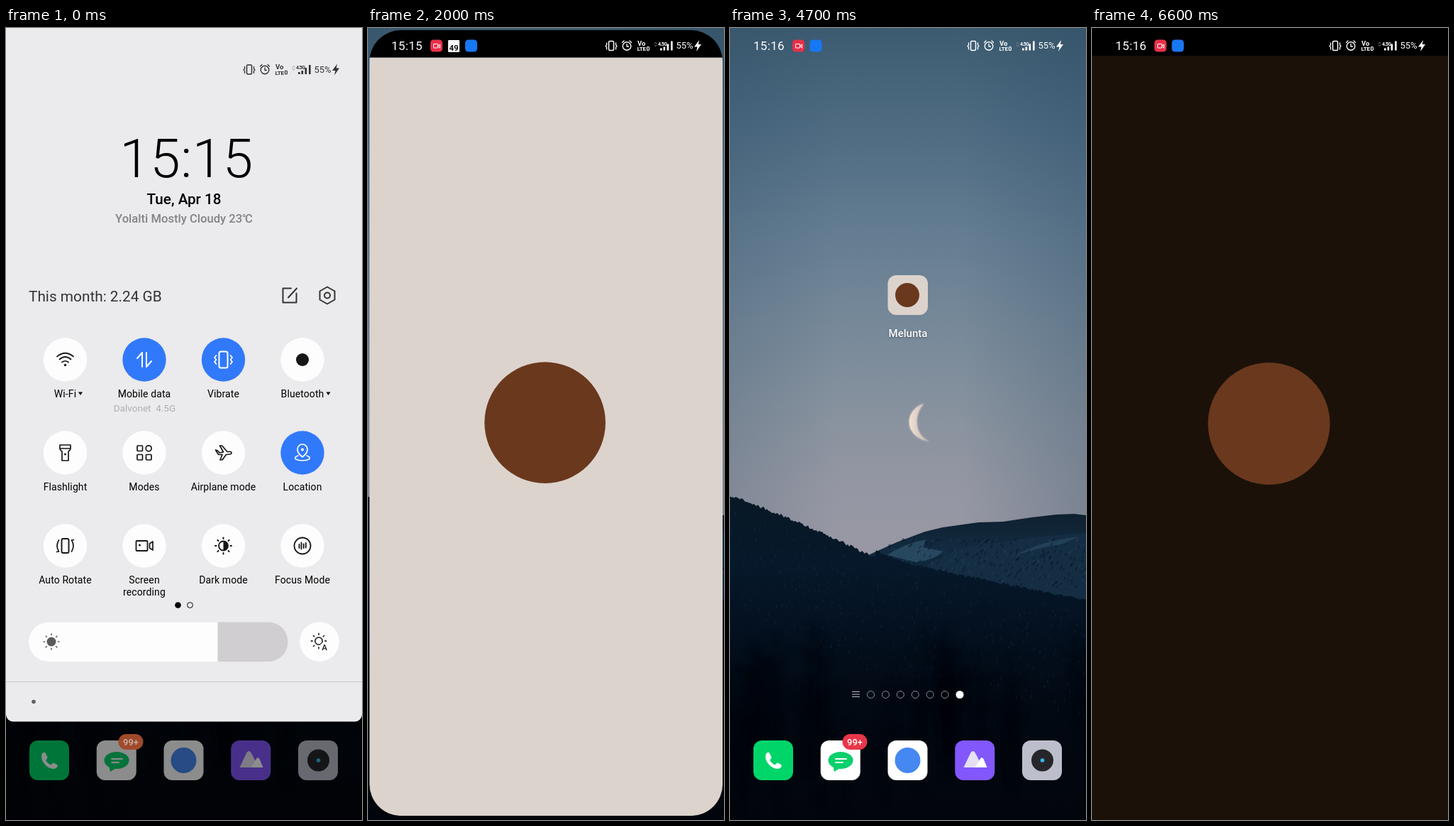
These frames come from a looping animation (502 px wide and 1115 px high, 7.3 s). An HTML page with a canvas:

```html
<!DOCTYPE html>
<html lang="en">
<head>
<meta charset="utf-8">
<title>Phone theme demo</title>
<style>
html, body { margin: 0; width: 100%; height: 100%; overflow: hidden; background: #000; }
canvas { display: block; width: 502px; height: 1115px; }
</style>
</head>
<body>
<canvas id="stage" width="502" height="1115"></canvas>
<script>
const W = 502, H = 1115, LOOP = 7300, TAU = Math.PI * 2;
const BLUE = '#3179fb', BROWN = '#6a381d', FONT = 'Roboto, "Open Sans", sans-serif';
const screen = document.getElementById('stage').getContext('2d');
let c = screen;

function rng(seed) {
  return () => (seed = (seed * 16807) % 2147483647) / 2147483647;
}
function disc(x, y, r, color) {
  c.fillStyle = color;
  c.beginPath(); c.arc(x, y, r, 0, TAU); c.fill();
}
function ring(x, y, r, color, w = 1.6) {
  c.strokeStyle = color; c.lineWidth = w;
  c.beginPath(); c.arc(x, y, r, 0, TAU); c.stroke();
}
function boxPath(x, y, w, h, r) {
  c.beginPath(); c.roundRect(x, y, w, h, r);
}
function box(x, y, w, h, r, color) {
  c.fillStyle = color; boxPath(x, y, w, h, r); c.fill();
}
function frame(x, y, w, h, r, color, lw = 1.7) {
  c.strokeStyle = color; c.lineWidth = lw; boxPath(x, y, w, h, r); c.stroke();
}
// Stroke or fill an SVG path placed at x, y
function draw(d, x, y, color, lw = 1.7, fill = false) {
  c.save();
  c.translate(x, y);
  c.lineCap = c.lineJoin = 'round';
  c.strokeStyle = c.fillStyle = color;
  c.lineWidth = lw;
  fill ? c.fill(new Path2D(d)) : c.stroke(new Path2D(d));
  c.restore();
}
function text(s, x, y, size, color, align = 'center', weight = 400, space = 0) {
  c.font = `${weight} ${size}px ${FONT}`;
  c.letterSpacing = space + 'px';
  c.textAlign = align;
  c.fillStyle = color;
  c.fillText(s, x, y);
}
function rays(x, y, r1, r2, color, w = 1.8) {
  let d = '';
  for (let i = 0; i < 8; i++) {
    const a = i * TAU / 8, p = Math.cos(a), q = Math.sin(a);
    d += `M${p * r1} ${q * r1}L${p * r2} ${q * r2}`;
  }
  draw(d, x, y, color, w);
}

// ---- wallpaper ----
function makeWallpaper() {
  const cv = document.createElement('canvas');
  cv.width = W; cv.height = H;
  c = cv.getContext('2d');
  const rand = rng(77);
  const fade = (y0, y1, stops) => {
    const g = c.createLinearGradient(0, y0, 0, y1);
    stops.forEach(([y, col]) => g.addColorStop((y - y0) / (y1 - y0), col));
    return g;
  };
  c.fillStyle = fade(0, 740, [[0, '#3d5b70'], [150, '#4f6c83'], [300, '#667e92'],
    [430, '#788a9a'], [560, '#8a939f'], [650, '#9497a3'], [740, '#9898a4']]);
  c.fillRect(0, 0, W, H);
  // darker, bluer edges
  const edge = c.createLinearGradient(0, 0, W, 0);
  edge.addColorStop(0, 'rgba(30,62,90,.16)');
  edge.addColorStop(.3, 'rgba(30,62,90,0)');
  edge.addColorStop(.65, 'rgba(30,62,90,0)');
  edge.addColorStop(1, 'rgba(30,62,90,.22)');
  c.fillStyle = edge;
  c.fillRect(0, 0, W, H);

  c.shadowColor = '#e8d5c8'; c.shadowBlur = 3;
  const moon = c.createLinearGradient(252, 0, 276, 0);
  moon.addColorStop(0, '#f3e2d4'); moon.addColorStop(1, '#c9bcb8');
  draw('M273 529C246 538 244 575 281 582C260 574 258 545 273 529Z', 0, 0, moon, 1, true);
  c.shadowBlur = 0;

  // far range
  draw('M195 742L235 724L275 709L300 703L350 696L385 695L425 689L460 685L485 684L502 686V830H195Z',
    0, 0, fade(684, 810, [[684, '#0f2030'], [735, '#122b40'], [810, '#081a2b']]), 1, true);
  draw('M222 742Q245 726 277 720L272 731L301 737Q285 750 262 752Z', 0, 0, '#27475f', 1, true);
  draw('M276 758Q318 728 380 724Q440 714 502 711V812L400 792Z', 0, 0, '#142d42', 1, true);
  draw('M402 742Q440 722 492 716L470 726L440 732Z', 0, 0, '#213f57', 1, true);
  for (let i = 0; i < 320; i++) {
    const x = 225 + rand() * 277, y = 718 + rand() * 70;
    draw('M0 0l-2 3', x, y, rand() < .55 ? 'rgba(6,18,30,.5)' : 'rgba(56,92,120,.22)', 1.5);
  }

  // wooded slope
  const ridge = x => x < 205 ? 660 + x * .43 - 3.5 * Math.sin(x / 205 * Math.PI)
    : 748 - 11 * Math.exp(-(x - 205) / 30) + (x - 205) * .2;
  c.fillStyle = fade(660, H, [[660, '#081826'], [760, '#06182a'], [850, '#04101f'], [950, '#020912'], [H, '#02050c']]);
  c.beginPath(); c.moveTo(0, H);
  for (let x = 0; x <= W; x += 2) c.lineTo(x, ridge(x) - rand() * 4);
  c.lineTo(W, H); c.fill();
  for (let i = 0; i < 650; i++) {
    const x = rand() * W, y = ridge(x) + 12 + rand() * 150;
    draw('M0 0v3', x, y, `rgba(58,88,114,${rand() * .24})`, 1.2);
  }
  c.filter = 'blur(5px)';
  for (let i = 0; i < 40; i++) {
    const x = rand() * W, y = 840 + rand() * 150;
    draw('M0 130Q-4 60 0 0M-16 32L0 46L15 28', x, y, 'rgba(0,3,9,.32)', 7);
  }
  c = screen;
  return cv;
}
const wallpaper = makeWallpaper();

// ---- status bar ----
function statusIcons(y, col) {
  frame(339.5, y - 6.5, 7, 13, 1.5, col, 1.5);
  draw('M-6 -4v3l-1.5 1.5l1.5 1.5v3M7 -4v3l1.5 1.5l-1.5 1.5v3', 342.5, y, col, 1.3);
  ring(365, y + .5, 5.8, col, 1.4);
  draw('M0 -2.5V1H2.5M-6.5 -4.5L-4 -7M6.5 -4.5L4 -7', 365, y, col, 1.3);
  text('Vo', 380, y - .5, 9.5, col, 'left', 700);
  text('LTE', 379.5, y + 7, 8, col, 'left', 700, -.2);
  frame(393.5, y + 1.5, 2.8, 5, 1, col, 1.2);
  text('4.5G', 409, y - .5, 7, col, 'left', 700, -.6);
  draw('M-1.5 -3L0 -5L1.5 -3M-1.5 -1L0 1L1.5 -1', 405.5, y, '#8a929a', .8);
  [[412, 3], [416.5, 5], [421.5, 9], [427, 13]].forEach(([x, h]) => {
    c.fillStyle = col; c.fillRect(x, y + 6.5 - h, 2.6, h);
  });
  text('55%', 434.5, y + 4, 13, col, 'left');
  draw('M2 -8L-5 1.5H-.5L-2 8L5 -2H.8Z', 465, y, col, 1, true);
}
function count(x, y, bg, fg) {
  box(x, y, 16, 17, 1, bg);
  text('49', x + 8, y + 15, 11.5, fg, 'center', 700);
}
function statusBar(time, badge) {
  text(time, 33, 31, 17, '#fff', 'left', 400, .3);
  box(88, 16.5, 17, 17, 4.5, '#e8304a');
  frame(92.5, 22.5, 6, 5.5, .5, '#fff', 1);
  draw('M99 25L101.5 23V28Z', 0, 0, '#fff', 1);
  if (badge) count(113, 17, '#fff', '#111');
  box(badge ? 137 : 112.5, 16.5, 17, 17, 4.5, '#1877f2');
  statusIcons(25, '#fff');
}

// ---- home screen ----
function dock() {
  ['#00d56a', '#fff', '#fff', '#8257fb', '#bcbfcb'].forEach((col, i) =>
    box(33 + i * 94.75, 1003, 56, 56, 12, col));
  draw('M-10 -9Q-8 -13 -5 -11L-2 -5Q-2 -3 -4.5 -1Q-2 4 3 6Q5 3 7 3L12 6Q13 9 9 11Q2 13 -5 6Q-12 -1 -10 -9Z',
    60.5, 1031.5, '#fff', 1, true);
  c.fillStyle = '#0bd06b';
  c.beginPath(); c.ellipse(156, 1031, 17.5, 12, 0, 0, TAU); c.fill();
  draw('M-11 7L-9 16L1 10Z', 156, 1031, '#0bd06b', 1, true);
  draw('M-7 -2H8M-7 3H3', 156, 1031, '#fff', 1.8);
  disc(250.5, 1031, 18, '#4688f1');
  draw('M-16 10L-6 -11Q-3 -15 0 -11L11 10Z', 345.5, 1031, '#e5e0f2', 1, true);
  draw('M0 10L8 -3Q10 -5 12 -2L17 10Z', 345.5, 1031, '#fff', 1, true);
  disc(440.5, 1031, 15.5, '#26262a');
  disc(440.5, 1031, 2.8, '#36b9e6');
}
function dockBadge(bg, fg) {
  box(158.5, 994, 35, 22, 11, bg);
  text('99+', 176, 1009.5, 13, fg, 'center', 500);
}
function home(label) {
  c.drawImage(wallpaper, 0, 0);
  box(222.5, 348, 56.5, 56, 12, '#dcd3cc');
  disc(250, 376, 17, BROWN);
  if (label) {
    c.shadowColor = 'rgba(0,0,0,.45)'; c.shadowBlur = 3; c.shadowOffsetY = 1;
    text('Melunta', 251, 435, 15, '#fff', 'center', 500);
    c.shadowColor = 'transparent'; c.shadowBlur = c.shadowOffsetY = 0;
  }
  draw('M-5 -3.5H5M-5 0H5M-5 3.5H5', 177.5, 938, '#b9bec6', 1.1);
  for (let i = 0; i < 6; i++) ring(198.5 + i * 20.9, 938.5, 5, '#8b929c', 1);
  disc(324, 938.5, 5.5, '#fff');
  dock();
  dockBadge('#e8364a', '#fff');
}

// ---- quick settings ----
const icons = {
  wifi(x, y, k) {
    draw('M-11.5 -4.5Q0 -14 11.5 -4.5M-8 -.5Q0 -7.5 8 -.5M-4.5 3.5Q0 0 4.5 3.5', x, y, k);
    disc(x, y + 7.5, 1.7, k);
  },
  data(x, y, k) { draw('M-10 -2L-3 -10V10M3 -10V10L10 2', x, y, k, 2); },
  vibrate(x, y, k) {
    frame(x - 6, y - 11.5, 12, 23, 2.5, k, 2);
    draw('M-10 -6L-12.5 -3L-10 0L-12.5 3L-10 6M10 -6L12.5 -3L10 0L12.5 3L10 6', x, y, k, 1.8);
  },
  bluetooth(x, y, k) { disc(x, y, 9, k); },
  torch(x, y, k) {
    draw('M-7.5 -11H7.5V-6Q7 -3 4.5 -2V11H-4.5V-2Q-7 -3 -7.5 -6ZM-7 -6H7', x, y, k);
    disc(x, y + 2, 1.5, k);
  },
  modes(x, y, k) {
    frame(x - 10, y - 10, 7.5, 7.5, 1, k);
    frame(x - 10, y + 2.5, 7.5, 7.5, 1, k);
    frame(x + 2.5, y + 2.5, 7.5, 7.5, 1, k);
    ring(x + 6.2, y - 6.2, 4, k, 1.7);
  },
  plane(x, y, k) {
    draw('M-11 -4L-8 -3L-5.5 0L0 -1L-5 -10H-2L5.5 -1.5L10 -1.5Q13 0 10 2L4 2.5L-1.5 10H-4.5L-1.5 2.5L-7 2.5L-11 -4Z', x, y, k);
  },
  place(x, y, k) {
    draw('M0 6Q-7.5 0 -7 -5A7 7 0 0 1 7 -5Q7.5 0 0 6ZM-6 4Q-12 6 -9.5 9Q-6 11 0 11Q6 11 9.5 9Q12 6 6 4', x, y, k);
    disc(x, y - 4.5, 2, k);
  },
  rotate(x, y, k) {
    frame(x - 5, y - 10, 10, 20, 2, k, 1.9);
    draw('M-9 -8Q-14 0 -9 8L-12 8.5M9 8Q14 0 9 -8L12 -8.5', x, y, k);
  },
  record(x, y, k) {
    frame(x - 11.5, y - 7, 16, 14, 1, k, 1.8);
    draw('M7.5 -3L12 -6V6L7.5 3Z', x, y, k);
    disc(x - 6.5, y - 1, 1.5, k);
  },
  dark(x, y, k) {
    ring(x, y, 6.5, k, 1.8);
    draw('M0 -6.5A6.5 6.5 0 0 1 0 6.5Z', x, y, k, 1, true);
    rays(x, y, 10, 11.5, k, 2);
  },
  focus(x, y, k) {
    ring(x, y, 11.5, k, 1.8);
    draw('M-4.5 -2V3M-1.5 -4.5V4.5M1.7 -2.5V3M4.8 -4V2.5', x, y, k, 1.8);
  }
};
const tiles = [
  ['wifi', 'Wi-Fi'], ['data', 'Mobile data', 1], ['vibrate', 'Vibrate', 1], ['bluetooth', 'Bluetooth'],
  ['torch', 'Flashlight'], ['modes', 'Modes'], ['plane', 'Airplane mode'], ['place', 'Location', 1],
  ['rotate', 'Auto Rotate'], ['record', 'Screen'], ['dark', 'Dark mode'], ['focus', 'Focus Mode']
];
const light = { bg: '#ebeaec', ink: '#000', soft: '#333', dim: '#858386', sub: '#b0aeb1', tile: '#fdfdfe',
  icon: '#161616', rest: '#d0ced0', fill: '#fdfdfe', sun: '#5c5b5d', rule: '#c8c7c9' };
const night = { bg: '#111012', ink: '#fff', soft: '#f2f2f2', dim: '#807e81', sub: '#59585a', tile: '#4c4a4d',
  icon: '#a3a2a4', rest: '#2f2d30', fill: '#4c4a4d', sun: '#d2d1d3', rule: '#1b1a1c' };

function shade(p) {
  const isNight = p === night;
  c.drawImage(wallpaper, 0, 0);
  dock();
  c.fillStyle = 'rgba(0,0,0,.45)'; c.fillRect(0, 0, W, H);
  dockBadge('#a04a2b', '#c9b3aa');
  box(0, 0, W, 976.5, [0, 0, 10, 10], p.bg);

  statusIcons(58.5, p.soft);
  text('15:15', 254.5, 209.5, 76.5, p.ink, 'center', 300, .5);
  text('Tue, Apr 18', 251, 248, 20.7, p.ink, 'center', 500);
  text('Yolalti Mostly Cloudy 23℃', 251, 274, 16.6, p.dim, 'center', 500);
  text('This month: 2.24 GB', 32, 384.5, 20.8, p.soft, 'left');
  draw('M2 -10H-9.5V10H9.5V-3M-2 3L10 -10', 400, 376.5, p.soft, 2);
  draw('M0 -12L10.5 -6V6L0 12L-10.5 6V-6Z', 453, 376.5, p.soft, 2);
  ring(453, 376.5, 4, p.soft, 2);

  tiles.forEach(([icon, label, on], i) => {
    const x = 83.5 + (i % 4) * 111.5, y = 467 + Math.floor(i / 4) * 131;
    const lit = on || (icon === 'dark' && isNight);
    const arrow = icon === 'wifi' || icon === 'bluetooth';
    disc(x, y, 30.7, lit ? BLUE : p.tile);
    icons[icon](x, y, lit ? '#fff' : p.icon);
    text(label, x, y + 53, 14, p.ink, 'center', 400, .1);
    if (arrow) draw('M-3 -2H3L0 2.5Z', icon === 'wifi' ? 105 : 454.5, y + 47.5, p.ink, 1, true);
  });
  text('Dalvonet  4.5G', 195.5, 539.5, 13.5, p.sub);
  text('recording', 195, 799, 14, p.ink, 'center', 400, .1);

  disc(242.5, 812.5, 4.3, p.ink);
  ring(259.5, 812.5, 3.9, p.ink, 1);

  c.save();
  boxPath(32, 836.5, 365.5, 55.5, 27.7); c.clip();
  c.fillStyle = p.rest; c.fillRect(32, 836, 366, 57);
  c.fillStyle = p.fill; c.fillRect(32, 836, 266.5, 57);
  c.restore();
  disc(64, 864, 6.5, p.sun);
  rays(64, 864, 9.5, 11, p.sun, 1.6);
  disc(442, 864, 27.8, p.tile);
  if (isNight) text('A', 442, 871, 19, '#d0cfd1', 'center', 500);
  else {
    ring(441, 863, 5.2, '#333', 1.8);
    rays(441, 863, 9, 10.5, '#333', 1.8);
    disc(449, 871, 6, p.tile);
    text('A', 449, 876, 11.5, '#333', 'center', 700);
  }
  c.fillStyle = p.rule; c.fillRect(0, 920, W, 1);
  if (isNight) {
    count(32, 941, '#dd5a2b', '#111');
    disc(63, 949, 3, '#fff');
  } else disc(39, 948.5, 2.8, '#5f5e60');
}

// ---- app launch: the whole window scales up around the icon ----
function launch(u, bg) {
  if (u <= 0) return;
  u = Math.min(u, 1);
  const q = (1 - u) ** 3, s = 1 - .888 * q;
  c.save();
  c.translate(262 * (1 - s), 378 * (1 - s));
  c.scale(s, s);
  if (u < 1) { boxPath(0, 0, W, H, 45); c.clip(); }
  c.globalAlpha = Math.min(1, u / .64);
  c.fillStyle = '#000'; c.fillRect(0, 0, W, 39);
  c.fillStyle = bg; c.fillRect(0, 39, W, H - 39);
  disc(249.5, 557, 86, BROWN);
  c.restore();
}

function render(t) {
  if (t < 1000) shade(light);
  else if (t >= 3600 && t < 4600) shade(night);
  else {
    const late = t >= 4600;
    const u = (t - (late ? 5291 : 1691)) / 390;
    home(u <= 0);
    launch(u, late ? '#1b1109' : '#dcd3cc');
    statusBar(late ? '15:16' : '15:15', !late);
  }
}
const start = performance.now();
function tick() {
  const t = (performance.now() - start) % LOOP;
  render(Math.floor(t / 100) * 100);
  requestAnimationFrame(tick);
}
tick();
</script>
</body>
</html>
```
